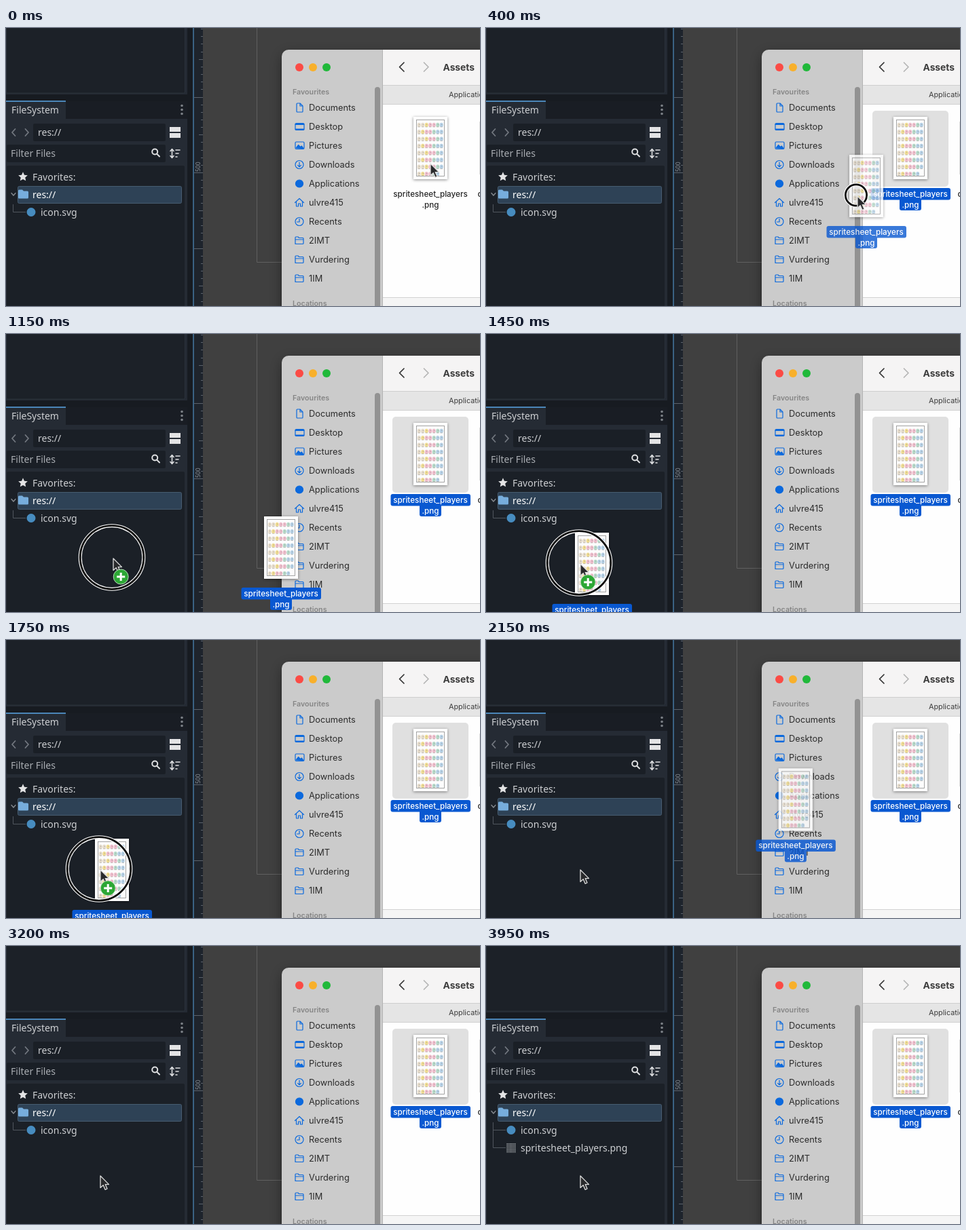
Animation, 698 px wide and 410 px high, one loop 4600 ms. Source, as an HTML page:

```html
<!DOCTYPE html>
<html lang="en">
<head>
<meta charset="utf-8">
<title>Drag a file into the project</title>
<style>
html, body { margin: 0; width: 100%; height: 100%; overflow: hidden; background: #404040; }
svg { display: block; }
.ed { font: 14px "Noto Sans", "Open Sans", sans-serif; fill: #cdcfd2; }
.mac { font: 12.8px Inter, sans-serif; fill: #2b2b2b; }
.head { font: 600 10.7px Inter, sans-serif; fill: #858585; }
.name { font: 500 11.7px Inter, sans-serif; text-anchor: middle; fill: #262626; }
.inv { fill: #fff; }
.ico { fill: none; stroke: #0b69dd; stroke-width: 1.2; stroke-linejoin: round; stroke-linecap: round; }
.line { fill: none; stroke-linecap: round; stroke-linejoin: round; }
</style>
</head>
<body>
<svg id="stage" width="698" height="410" viewBox="0 0 698 410">
  <defs>
    <filter id="soft" x="-30%" y="-20%" width="160%" height="140%">
      <feDropShadow dx="0" dy="1" stdDeviation="2" flood-opacity=".45"/>
    </filter>
    <filter id="deep" x="-20%" y="-20%" width="140%" height="140%">
      <feDropShadow dx="0" dy="6" stdDeviation="9" flood-opacity=".38"/>
    </filter>
    <g id="sheet">
      <rect x="-25" y="-46" width="50" height="92" fill="#fff" filter="url(#soft)"/>
      <rect x="-20.5" y="-41.5" width="41" height="83" fill="#fcfcfc" stroke="#9a9a9a" stroke-width=".9"/>
      <g id="sprites"></g>
    </g>
    <g id="picked">
      <rect x="-58.500" y="59" width="117.500" height="17.5" rx="3" fill="#0958d1"/>
      <rect x="-16" y="74" width="32" height="18" rx="3" fill="#0958d1"/>
      <text class="name inv" y="72">spritesheet_players</text>
      <text class="name inv" y="88">.png</text>
    </g>
    <path id="folder" class="ico" d="M-6 5V-4.5Q-6-5.5-5-5.5H-2L-.5-4H5Q6-4 6-3V4Q6 5 5 5H-5Q-6 5-6 4M-6-1.5H6"/>
  </defs>

  <!-- editor docks -->
  <rect width="290" height="410" fill="#171b21"/>
  <rect width="267" height="98" fill="#242a33"/>
  <rect x=".5" y="-5" width="263" height="101" rx="2" fill="#1c2128" stroke="#2b323b"/>
  <rect y="108" width="267" height="26" fill="#191d24"/>
  <rect y="108" width="88" height="27" fill="#252b34"/>
  <rect y="107" width="88" height="2" fill="#4b86b8"/>
  <rect y="134" width="267" height="276" fill="#252b34"/>
  <rect x="40" y="141" width="195" height="26" rx="2" fill="#1a1f26"/>
  <rect x="1" y="172" width="234" height="26" rx="2" fill="#1a1f26"/>
  <rect x="1" y="203" width="262" height="215" rx="2" fill="#1b2027"/>
  <g fill="#7b8087"><circle cx="259" cy="114.500" r="1.8"/><circle cx="259" cy="120.500" r="1.8"/><circle cx="259" cy="126.500" r="1.8"/></g>
  <g class="line" stroke="#737880" stroke-width="1.8">
    <path d="M13.500 149L9 154L13.500 159"/><path d="M28.500 149L33 154L28.500 159"/>
  </g>
  <path d="M241 146h16v7h-16zM241 155h16v7h-16z" fill="#e4e4e5"/>
  <g class="line" stroke="#dedfe1" stroke-width="2">
    <circle cx="219.200" cy="182.500" r="4"/><path d="M222.500 186L226 189.500"/>
    <path stroke-width="1.6" d="M244.500 180V190M242 181.500L244.500 178.500L247 181.500M242 188.500L244.500 191.500L247 188.500M250 180H256M250 185H254M250 190H252"/>
  </g>
  <rect x="17.5" y="233.500" width="241" height="25" rx="2" fill="#2e4256" stroke="#475c70"/>
  <path id="star" fill="#e4e4e5"/>
  <path d="M18 240q0-1.500 1.500-1.500h4.500l2 2h5.500q1.500 0 1.500 1.500v8q0 1.500-1.500 1.500h-12q-1.500 0-1.500-1.500z" fill="#77addc"/>
  <path class="line" d="M8 243.500L11 247L14 243.500" stroke="#858a90" stroke-width="1.4"/>
  <path d="M10.500 260V271.500H29" fill="none" stroke="#50565e"/>
  <circle cx="37" cy="271.500" r="6.500" fill="#478cbf"/>
  <g class="ed">
    <text x="8" y="126">FileSystem</text><text x="47" y="158.500">res://</text>
    <text x="7" y="189.500" fill="#a9adb2">Filter Files</text>
    <text x="39" y="224.500">Favorites:</text><text x="39" y="250.500" fill="#fff">res://</text>
    <text x="51" y="276.500">icon.svg</text>
  </g>
  <g id="added">
    <path d="M10.500 271V297.500H29" fill="none" stroke="#50565e"/>
    <g id="mini" fill="#a7abaf"></g>
    <text class="ed" x="51" y="302.500">spritesheet_players.png</text>
  </g>

  <!-- ruler and canvas -->
  <rect x="275" width="2" height="410" fill="#3a6283"/>
  <rect x="277" width="13" height="410" fill="#1e242c"/>
  <path id="ticks" fill="none" stroke="#5c636c"/>
  <text transform="translate(285.500 212) rotate(-90)" style="font:8.500px 'Noto Sans',sans-serif" fill="#8c9299">500</text>
  <rect x="290" width="408" height="410" fill="#404040"/>
  <path d="M369.500 0V345.500H420" fill="none" stroke="#606060"/>

  <!-- file browser -->
  <rect x="406" y="32" width="320" height="420" rx="10" fill="#cbcbcb" filter="url(#deep)"/>
  <rect x="555" y="32" width="143" height="52" fill="#f5f4f4"/>
  <rect x="555" y="84" width="143" height="28" fill="#e5e5e5"/>
  <path d="M555 84.500H698M555 112.500H698" stroke="#cfcfcf"/>
  <rect x="555" y="113" width="143" height="284" fill="#fefefe"/>
  <rect x="555" y="397" width="143" height="13" fill="#f5f5f5"/>
  <path d="M555 397.500H698" stroke="#d2d2d2"/>
  <path d="M554.500 32V410" stroke="#b4b4b4"/>
  <rect x="543" y="87" width="8" height="340" rx="4" fill="#929292"/>
  <circle cx="432" cy="58" r="6" fill="#fb4b45"/><circle cx="452" cy="58" r="6" fill="#f8b02b"/><circle cx="472" cy="58" r="6" fill="#20b93a"/>
  <g class="line" stroke-width="1.7">
    <path d="M586 51L579.500 57.500L586 64" stroke="#333"/><path d="M615.500 51L622 57.500L615.500 64" stroke="#b5b5b5"/>
  </g>
  <text x="643.500" y="63" style="font:700 13.800px Inter,sans-serif" fill="#3c3c3c">Assets</text>
  <text x="652" y="102" style="font:10.800px Inter,sans-serif" fill="#3c3c3c">Applications</text>
  <text class="head" x="422" y="98">Favourites</text>
  <text class="head" x="422" y="410">Locations</text>
  <g id="places" class="mac"></g>
  <g class="ico">
    <path d="M428 112q0-1 1-1h4l4 4v8q0 1-1 1h-7q-1 0-1-1zM433 111v4h4"/>
    <rect x="426" y="140.500" width="13" height="10" rx="1.500"/><path d="M426.500 142H438.500M426.500 149.500H438.500" stroke-width="1.8"/>
    <rect x="426" y="168" width="13" height="10.500" rx="1.500"/><path d="M427 177L430.500 172.500L433.500 175.500L435.500 174L438 177.500Z" fill="#0b69dd"/>
    <circle cx="432" cy="201.500" r="6"/><path d="M432 198V204.500M429.500 202.300L432 204.800L434.500 202.300"/>
    <circle cx="432" cy="229.500" r="5.500" fill="#0b69dd"/>
    <path d="M425.500 257.500L432 251.500L438.500 257.500M427.500 256.500V263H430.500V259H433.500V263H436.500V256.500"/>
    <circle cx="432" cy="285.500" r="6"/><path d="M432 281.500V286H428.500"/>
  </g>
  <use href="#folder" x="432" y="313.500"/><use href="#folder" x="432" y="341.500"/><use href="#folder" x="432" y="369.500"/>

  <rect id="pad" x="569" y="122" width="112" height="112" rx="5" fill="#e0e0e0"/>
  <use href="#sheet" x="625" y="177"/>
  <g id="plain"><text class="name" x="625" y="249">spritesheet_players</text><text class="name" x="625" y="265">.png</text></g>
  <use id="chosen" href="#picked" x="625" y="177"/>
  <path d="M697.500 138V216" stroke="#dedede"/>
  <text x="694.500" y="249" style="font:500 11.700px Inter,sans-serif" fill="#262626">coins</text>

  <g id="ghost"><use href="#sheet"/><use href="#picked"/></g>
  <g id="ring" fill="none">
    <circle stroke="#fff" stroke-width="5"/><circle stroke="#0b0b0b" stroke-width="2.800"/>
  </g>
  <g id="cursor">
    <path d="M0 0V17.500L4.200 13.700L7 20.300L10 19L7.200 12.600H12.500Z" fill="#292a2c" stroke="#dcdcdc" stroke-width="1.300" stroke-linejoin="round"/>
    <g id="plus">
      <circle cx="11.200" cy="27" r="11" fill="#2da735" stroke="#d9eeda" stroke-width=".8"/>
      <path d="M5.200 27H17.200M11.200 21V33" stroke="#fff" stroke-width="3"/>
    </g>
  </g>
</svg>
<script>
const LOOP = 4600, STEP = 50;
const PRESS = 100, LIFT = 150, DROP = 1850, HOME = 2355, IMPORTED = 3800;
const $ = id => document.getElementById(id);
const show = (id, on) => $(id).setAttribute("display", on ? "inline" : "none");
const move = (id, [x, y]) => $(id).setAttribute("transform", `translate(${x} ${y})`);
const clamp = v => Math.max(0, Math.min(1, v));
const smooth = v => (v = clamp(v)) * v * (3 - 2 * v);

// [time, x, y]
const pointer = [[0, 625, 200], [150, 623, 202], [400, 547, 248], [550, 490, 284], [650, 463, 302],
  [850, 432, 308], [1000, 330, 318], [1150, 158, 331], [1300, 139, 339], [1750, 139, 339]];
const dragged = [[150, 625, 177], [400, 560, 233], [550, 505, 280], [650, 480, 300], [900, 455, 306],
  [1150, 405, 315], [1300, 235, 332], [1450, 156, 339], [1850, 156, 339]];
const origin = [625, 177];

// cubic through the points, without overshoot
function along(keys, t) {
  const last = keys.length - 1;
  if (t <= keys[0][0]) return keys[0].slice(1);
  if (t >= keys[last][0]) return keys[last].slice(1);
  const i = keys.findIndex(k => k[0] > t) - 1;
  const span = keys[i + 1][0] - keys[i][0], u = (t - keys[i][0]) / span;
  const rate = (j, a) => (keys[j + 1][a] - keys[j][a]) / (keys[j + 1][0] - keys[j][0]);
  const slope = (j, a) => {
    if (j === 0 || j === last) return 0;
    const p = rate(j - 1, a), q = rate(j, a);
    return p * q > 0 ? 2 * p * q / (p + q) : 0;
  };
  return [1, 2].map(a => {
    const from = keys[i][a], to = keys[i + 1][a];
    return from + (to - from) * u * u * (3 - 2 * u)
      + span * u * (1 - u) * ((1 - u) * slope(i, a) - u * slope(i + 1, a));
  });
}

function build() {
  const tints = ["#e6dccb", "#f0dc90", "#efbccb", "#b5d9c8", "#b4d0e6"];
  let art = "";
  for (let n = 0; n < 55; n++) {
    const col = n % 7, row = Math.floor(n / 7);
    const tint = tints[Math.floor(col * 5 / 7 + row % 2 * .6) % 5];
    const x = -16.8 + col * 5.5, y = -34 + row * 10.3;
    art += `<ellipse cx="${x}" cy="${y}" rx="2.5" ry="3.2" fill="${tint}"/>`
      + `<path d="M${x - 1.8} ${y + 2.8}h3.6" stroke="#b3afab" stroke-width=".7"/>`
      + `<circle cx="${x + .5}" cy="${y - .7}" r=".6" fill="#96979a"/>`;
  }
  $("sprites").innerHTML = art;

  let mini = "";
  for (let n = 0; n < 48; n++)
    mini += `<rect x="${30.5 + n % 6 * 2.3}" y="${291 + Math.floor(n / 6) * 1.8}" width="1.5" height="1.1"/>`;
  $("mini").innerHTML = mini;

  let ticks = "";
  for (let k = -19; k < 18; k++) {
    const size = k % 10 === 0 ? 13 : k % 5 === 0 ? 6 : 3;
    ticks += `M290 ${Math.round(213 + k * 11.15) + .5}h${-size}`;
  }
  $("ticks").setAttribute("d", ticks);

  let star = "";
  for (let k = 0; k < 10; k++) {
    const a = k * Math.PI / 5, r = k % 2 ? 3.4 : 7.2;
    star += `${k ? "L" : "M"}${25 + r * Math.sin(a)} ${219.5 - r * Math.cos(a)}`;
  }
  $("star").setAttribute("d", star + "Z");

  const places = ["Documents", "Desktop", "Pictures", "Downloads", "Applications",
    "ulvre415", "Recents", "2IMT", "Vurdering", "1IM"];
  $("places").innerHTML = places.map((s, i) => `<text x="446" y="${122 + 28 * i}">${s}</text>`).join("");
}

function draw(t) {
  const held = t >= PRESS;
  show("pad", held);
  show("chosen", held);
  show("plain", !held);
  show("added", t >= IMPORTED);

  const tip = along(pointer, t);
  move("cursor", tip);
  show("plus", t >= 1050 && t < DROP);

  const back = smooth((t - DROP) / (HOME - DROP));
  move("ghost", along(dragged, t).map((v, i) => v + (origin[i] - v) * back));
  show("ghost", t >= LIFT && t < HOME);
  const solid = t < DROP ? .8 + .2 * clamp((t - 650) / 400) : 1 - .25 * back;
  $("ghost").setAttribute("opacity", solid);

  show("ring", held && t < DROP + 100);
  move("ring", [tip[0] - 2, tip[1] - 1.5]);
  const r = Math.min(46.8, (t - 40) * .0435);
  for (const c of $("ring").children) c.setAttribute("r", Math.max(0, r));
  $("ring").setAttribute("opacity", 1 - clamp((t - DROP) / 100));
}

function tick() {
  const t = performance.now() % LOOP;
  draw(Math.floor(t / STEP) * STEP);
  requestAnimationFrame(tick);
}

build();
tick();
</script>
</body>
</html>
```
